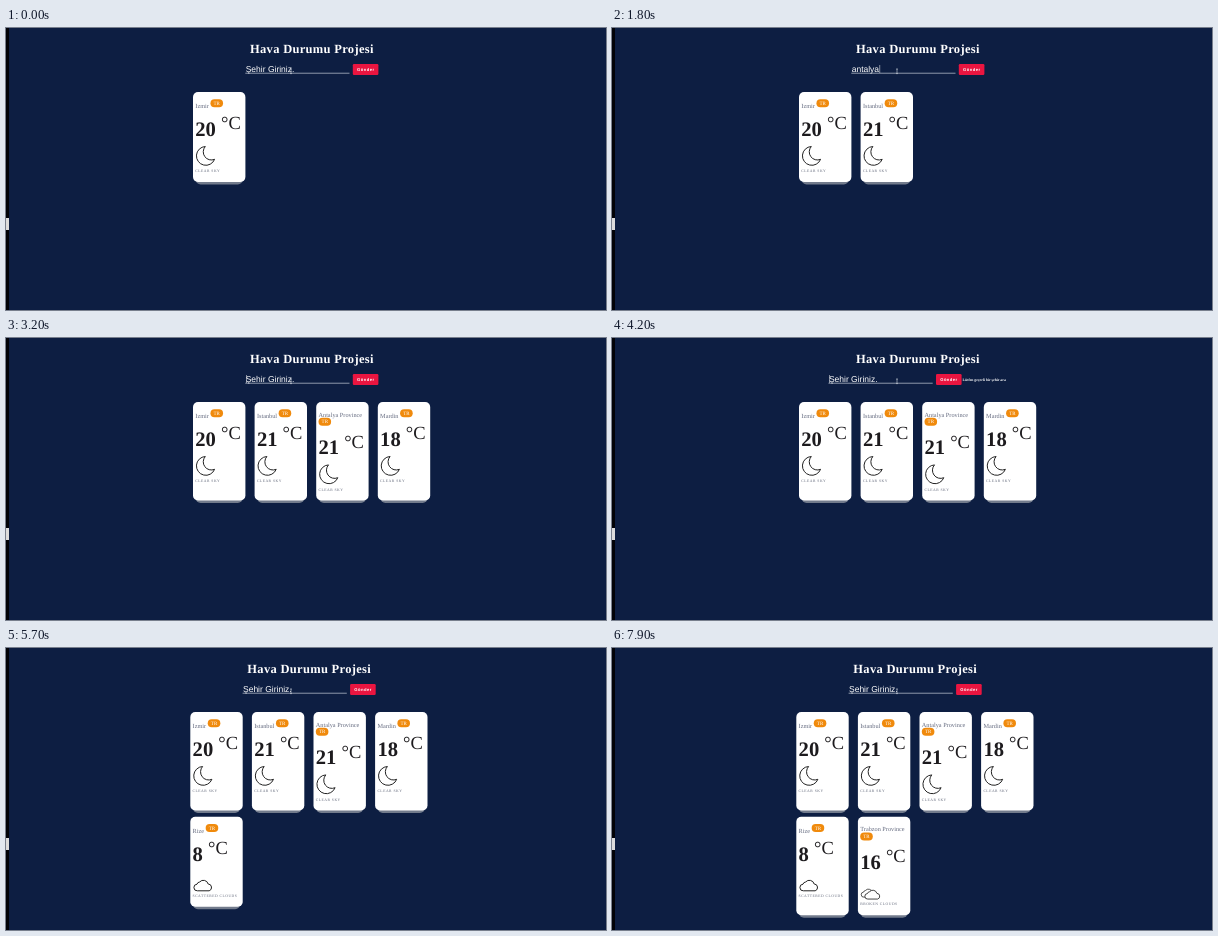
An HTML page that plays this animation: 600x282 px, repeating every 8000 ms.

```html
<!DOCTYPE html>
<html lang="tr">
<head>
<meta charset="utf-8">
<title>Hava Durumu</title>
<style>
  html, body { margin: 0; width: 100%; height: 100%; overflow: hidden; background: #0d1e42; }
  svg { display: block; width: 100vw; height: 100vh; }
  text { font-family: "Liberation Serif", serif; text-rendering: geometricPrecision; white-space: pre; }
  .sans { font-family: "Liberation Sans", sans-serif; }
  .icon path { fill: #fff; stroke: #222; stroke-width: 1; stroke-linejoin: round; }
</style>
</head>
<body>
<svg viewBox="0 0 600 282">
  <rect width="600" height="282" fill="#0d1e42"/>
  <rect width="3" height="282" fill="#020308"/>
  <rect y="190" width="3" height="12" fill="#dcdcdc"/>
  <g id="page"></g>
  <path d="M284 41h2M285 41v4.6M284 45.6h2" stroke="#cfd4de" stroke-width=".6" fill="none"/>
</svg>
<script>
const LOOP = 8000, KEY = 100;
const LINE = 8.4;          // extra height when the badge wraps
const COLUMN = 61.6, ROW = 104.8, CARD_W = 52.4, CARD_H = 90;
const page = document.getElementById('page');

const cards = [
  { at: 0, name: 'Izmir', temp: 20, sky: 'CLEAR SKY', icon: 'moon' },
  { at: 900, name: 'Istanbul', temp: 21, sky: 'CLEAR SKY', icon: 'moon' },
  { at: 1900, name: 'Antalya Province', temp: 21, sky: 'CLEAR SKY', icon: 'moon', wraps: true },
  { at: 2900, name: 'Mardin', temp: 18, sky: 'CLEAR SKY', icon: 'moon' },
  { at: 4700, name: 'Rize', temp: 8, sky: 'SCATTERED CLOUDS', icon: 'cloud' },
  { at: 7300, name: 'Trabzon Province', temp: 16, sky: 'BROKEN CLOUDS', icon: 'clouds', wraps: true },
];

// One key per 100 ms, a dash is a pause.
const entries = [
  { from: 100, keys: 'istanbul', to: 900 },
  { from: 1000, keys: 'ant-aly-a', to: 1900 },
  { from: 2300, keys: 'mardin', to: 2900 },
  { from: 3400, keys: 'asd', to: 3900 },
  { from: 4300, keys: 'rize', to: 4700 },
  { from: 6600, keys: 'trabzon', to: 7300 },
];
const error = { from: 3900, to: 4700 };

const cloud = 'M5.5 11.5a3.3 3.3 0 0 1-.4-6.6a3 3 0 0 1 2.6-2.2a5 5 0 0 1 8.6 2a3.5 3.5 0 0 1 1 6.8z';
const icons = {
  moon: '<path d="M12.3 54.5a9.4 9.4 0 1 0 9.3 12.8a8.1 8.1 0 0 1-9.3-12.8z"/>',
  cloud: `<path transform="translate(1.6 62.5)" d="${cloud}"/>`,
  clouds: `<path transform="translate(1.8 63.2) scale(.76)" d="${cloud}"/>
           <path transform="translate(5.3 64.2) scale(.84)" d="${cloud}"/>`,
};

const measure = document.createElement('canvas').getContext('2d');
function textWidth(text, size, family) {
  measure.font = `100px ${family}`;
  return measure.measureText(text).width * size / 100;
}

function label(text, x, y, size, fill, extra = '') {
  return `<text x="${x}" y="${y}" font-size="${size}" fill="${fill}" ${extra}>${text}</text>`;
}

function drawCard({ name, temp, sky, icon, wraps }, index, height) {
  const x = 187 + index % 4 * COLUMN, y = 64 + Math.floor(index / 4) * ROW;
  const drop = wraps ? LINE : 0;
  const badgeX = wraps ? 2.3 : 3.9 + textWidth(name, 6.25, '"Liberation Serif", serif');
  const badgeY = 7.3 + drop;
  const unitX = 2.3 + String(temp).length * 10.3 + 5.1;
  return `<g transform="translate(${x} ${y})">
    <rect x="2.6" y="20" width="${CARD_W - 5.2}" height="${height - 17.5}" rx="5" fill="#727b8c"/>
    <rect width="${CARD_W}" height="${height}" rx="5" fill="#fff"/>
    ${label(name, 2.3, wraps ? 14.5 : 16, 6.25, '#666c80')}
    <rect x="${badgeX}" y="${badgeY}" width="12.6" height="8" rx="4" fill="#f08a0c"/>
    ${label('TR', badgeX + 3.1, badgeY + 5.7, 5, '#fff')}
    <g transform="translate(0 ${drop})">
      ${label(temp, 2.3, 44, 20.6, '#1d1b1e', 'font-weight="bold"')}
      ${label('°C', unitX, 37.3, 18.5, '#1d1b1e')}
      <g class="icon">${icons[icon]}</g>
      ${label(sky, 2.3, 80.2, 3.75, '#62687a', 'letter-spacing=".47"')}
    </g>
  </g>`;
}

function drawForm(time) {
  const entry = entries.find(e => time >= e.from && time < e.to);
  const typed = entry
    ? entry.keys.slice(0, Math.floor((time - entry.from) / KEY) + 1).replaceAll('-', '') : '';
  const failed = time >= error.from && time < error.to;
  const caretOn = typed || time % 1100 >= 550;
  const caretX = 240.2 + textWidth(typed, 8.5, '"Liberation Sans", sans-serif');
  return `<g transform="translate(${failed ? -22.8 : 0} 0)">
    ${label(typed || 'Şehir Giriniz.', 239.7, 43.6, 8.5, '#fff', 'class="sans"')}
    ${caretOn ? `<rect x="${caretX}" y="37" width=".5" height="8" fill="#fff"/>` : ''}
    <rect x="239.3" y="44.8" width="104.2" height=".7" fill="#c4cad6"/>
    <rect x="346.8" y="36" width="25.6" height="11" rx="1.2" fill="#ea1540"/>
    ${label('Gönder', 351, 43, 4.17, '#fff', 'class="sans" font-weight="bold" letter-spacing=".45"')}
    ${failed ? label('Lütfen geçerli bir şehir ara', 373.4, 42.8, 3.75, '#fff', 'font-weight="bold"') : ''}
  </g>`;
}

function drawPage(time) {
  const shown = cards.filter(card => time >= card.at);
  const rowHeight = index => {
    const row = Math.floor(index / 4) * 4;
    return CARD_H + (shown.slice(row, row + 4).some(card => card.wraps) ? LINE : 0);
  };
  // The second row brings a scrollbar, which moves the centred content.
  page.setAttribute('transform', `translate(${shown.length > 4 ? -2.7 : 0} 0)`);
  page.innerHTML =
    label('Hava Durumu Projesi', 244, 25.3, 12.5, '#fff', 'font-weight="bold" letter-spacing=".31"') +
    drawForm(time) +
    shown.map((card, i) => drawCard(card, i, rowHeight(i))).join('');
}

let lastTick = -1;
function frame() {
  const time = performance.now() % LOOP;
  const tick = Math.floor(time / 50);
  if (tick !== lastTick) drawPage(time);
  lastTick = tick;
  requestAnimationFrame(frame);
}
frame();
</script>
</body>
</html>
```
